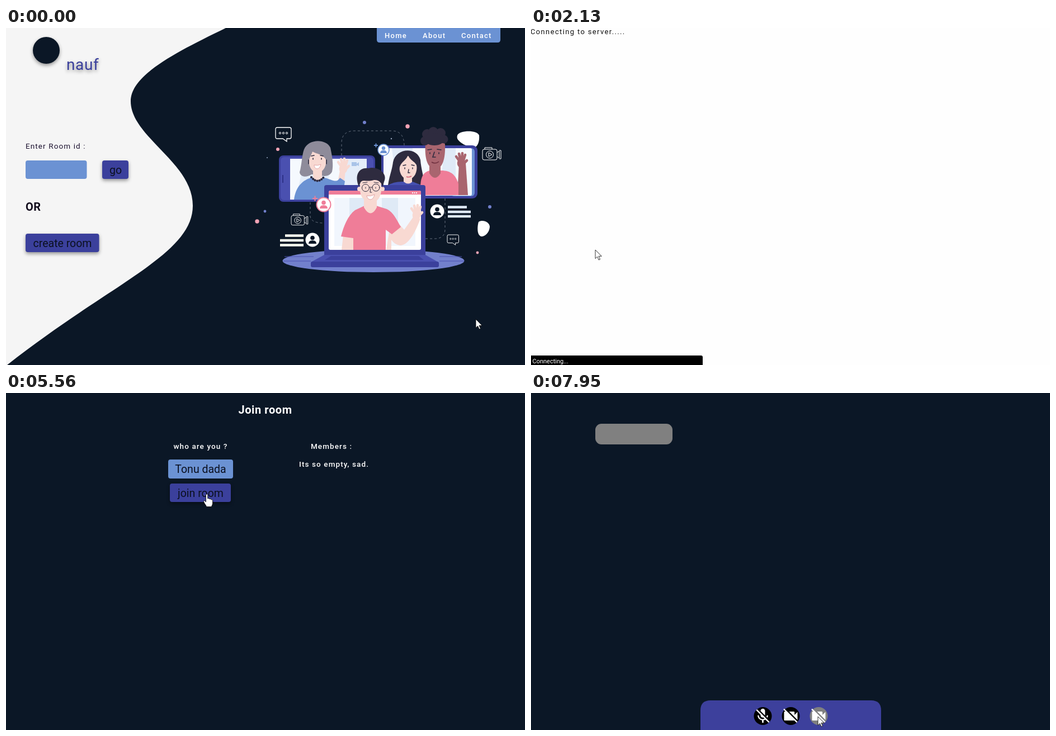
Recreate the animation shown at these times as an HTML page. Size 928 by 603 pixels, loop 8 s.

```html
<!DOCTYPE html>
<html lang="en">
<head>
<meta charset="utf-8">
<title>Video rooms</title>
<style>
html, body { margin: 0; width: 100%; height: 100%; overflow: hidden; background: #0b1726; }
svg { display: block; width: 928px; height: 603px; }
text { font-family: Roboto, "Open Sans", sans-serif; white-space: pre; }
.mid { text-anchor: middle; }
.btn { font-size: 19.5px; fill: #0b1020; text-anchor: middle; }
.small { font-size: 13.5px; letter-spacing: 1.1px; }
.nav { font-size: 13px; font-weight: 500; letter-spacing: 1.3px; fill: #fff; }
.blue { fill: #6b92d3; }
.indigo { fill: #3b409c; }
.pink { fill: #ef7d98; }
.dark { fill: #2e2b3f; }
.skin { fill: #f8d9d2; color: #f8d9d2; }
.brown { fill: #a9656f; color: #a9656f; }
.line { fill: none; stroke: #fff; }
.ink { fill: none; stroke: #2e2b3f; stroke-linecap: round; }
.drop { filter: drop-shadow(0 3px 3px rgba(0, 0, 0, .4)); }

#home, #wait, #join, #room { animation: home 8s step-end infinite; }
#wait { animation-name: wait; }
#join { animation-name: join; }
#room { animation-name: room; }
@keyframes home { 0% { visibility: visible } 25.5%, 100% { visibility: hidden } }
@keyframes wait { 0%, 28.25%, 100% { visibility: hidden } 25.5% { visibility: visible } }
@keyframes join { 0%, 70%, 100% { visibility: hidden } 28.25% { visibility: visible } }
@keyframes room { 0% { visibility: hidden } 70%, 100% { visibility: visible } }

#dots { animation: pulse 2s ease-in-out infinite; }
@keyframes pulse { 50% { opacity: .6 } }

.shine { fill: url(#shine); animation: sweepCreate 8s linear infinite; }
#join .shine { animation-name: sweepJoin; }
@keyframes sweepCreate { 0%, 21.5% { transform: translateX(-131px) } 25.6%, 100% { transform: translateX(131px) } }
@keyframes sweepJoin { 0%, 41.5% { transform: translateX(-109px) } 44.8%, 100% { transform: translateX(109px) } }

#tag { animation: tag 8s linear infinite; }
@keyframes tag { 0%, 76.5% { opacity: 0 } 79%, 88.6% { opacity: .75 } 91%, 100% { opacity: 0 } }
#share { animation: share 8s linear infinite; }
@keyframes share { 0%, 98.2% { fill: #000 } 99.1%, 100% { fill: #808080 } }
</style>
</head>
<body>
<svg viewBox="0 0 928 603">
<defs>
  <linearGradient id="shine" x2="1" y2=".1">
    <stop offset=".2" stop-color="#fff" stop-opacity="0"/>
    <stop offset=".5" stop-color="#fff" stop-opacity=".4"/>
    <stop offset=".8" stop-color="#fff" stop-opacity="0"/>
  </linearGradient>
  <clipPath id="createClip"><rect x="35" y="368" width="131" height="33" rx="4"/></clipPath>
  <clipPath id="joinClip"><rect x="293" y="162" width="109" height="33" rx="4"/></clipPath>
  <clipPath id="pillClip"><rect width="138" height="37" rx="11"/></clipPath>

  <g id="arrow"><path d="M0 0V15.5L3.6 12.2L6.1 18L8.5 17L6 11.3H11.2Z" fill="#fff" stroke="#000" stroke-width=".8"/></g>
  <g id="pointer"><path d="M-1.6 1.5C-1.6-.5 1.7-.5 1.7 1.5V8C3 7 5 7.4 5 9C6.3 8 8 8.6 8 10C9.4 9.4 10.5 10 10.5 11.5V16C10.5 19 9 20 8.5 22.5H-.5C-1 20-4 17.5-5.5 13.5C-6.2 11.3-3.7 10.7-1.6 14Z" fill="#fff" stroke="#000" stroke-width=".8"/></g>
  <g id="beam"><path d="M-3-7H3M0-7V7M-3 7H3" fill="none" stroke="#4a4038" stroke-width="1.2"/></g>
  <g id="grab">
    <path d="M-4-2V-4Q-3-6-1.7-4.5Q-.3-6.5 1.2-4.5Q2.8-6 3.8-3.8Q6-4 5.5-1Q5.5 3 3.5 6H-2.5Q-6 2-6.5-.5Q-5.5-2.5-4-1Z" fill="#fff" stroke="#000" stroke-width=".9"/>
    <circle id="press" r="11" fill="#e4de18" fill-opacity=".65"/>
  </g>

  <g id="hand" fill="none" stroke="currentColor" stroke-width="4.6" stroke-linecap="round">
    <path d="M-2 0L-9-10M-1-2L-4-15M1-2L2-16M3 0L7-13M3 4L10-3"/>
    <ellipse cy="2" rx="5" ry="6" fill="currentColor"/>
  </g>
  <g id="bubble">
    <path class="line" stroke-width="1.3" d="M3 0H25Q28 0 28 3V17Q28 20 25 20H20V25L13 20H3Q0 20 0 17V3Q0 0 3 0Z"/>
    <g class="line"><circle cx="8" cy="10" r="1.6"/><circle cx="14" cy="10" r="1.6"/><circle cx="20" cy="10" r="1.6"/></g>
  </g>
  <g id="camera" class="line">
    <rect y="4" width="26" height="19" rx="3"/>
    <path d="M4 4V1H17V4M26 10L30 7V20L26 17M30 6H33V21H30M11 10L17 13.5L11 17Z"/>
    <circle cx="13" cy="13.5" r="6.5"/>
  </g>
  <g id="person"><circle cy="-3.5" r="3.8"/><path d="M-7 7Q-7 1 0 1Q7 1 7 7Z"/></g>
  <path id="micOff" d="M19 11h-1.7c0 .74-.16 1.43-.43 2.05l1.23 1.23c.56-.98.9-2.09.9-3.28zm-4.02.17c0-.06.02-.11.02-.17V5c0-1.66-1.34-3-3-3S9 3.34 9 5v.18l5.98 5.99zM4.27 3L3 4.27l6.01 6.01V11c0 1.66 1.33 3 2.99 3 .22 0 .44-.03.65-.08l1.66 1.66c-.71.33-1.5.52-2.31.52-2.76 0-5.3-2.1-5.3-5.1H5c0 3.41 2.72 6.23 6 6.72V21h2v-3.28c.91-.13 1.77-.45 2.54-.9L19.73 21 21 19.73z"/>
  <path id="camOff" d="M21 6.5l-4 4V7c0-.55-.45-1-1-1H9.82L21 17.18zM3.27 2L2 3.27 4.73 6H4c-.55 0-1 .45-1 1v10c0 .55.45 1 1 1h12c.21 0 .39-.08.54-.18L19.73 21 21 19.73z"/>
</defs>

<rect width="928" height="603" fill="#0b1726"/>

<g id="home">
  <path d="M0 0H393C300 45 223 85 223 131C223 195 334 240 334 318C334 405 190 455 2 603H0Z" fill="#f5f5f5"/>
  <circle class="drop" cx="72" cy="40" r="24" fill="#0b1726"/>
  <text class="indigo drop" x="108" y="75" font-size="28" letter-spacing=".6">nauf</text>
  <path class="blue" d="M663 0H884V21Q884 26 879 26H668Q663 26 663 21Z"/>
  <text class="nav" x="677" y="18">Home</text>
  <text class="nav" x="745" y="18">About</text>
  <text class="nav" x="814" y="18">Contact</text>

  <text class="small" x="35" y="216" fill="#1c1230">Enter Room id :</text>
  <rect class="blue" x="35" y="237" width="109.500" height="33" rx="4"/>
  <rect class="indigo drop" x="172" y="237" width="47" height="33" rx="4"/>
  <text class="btn" x="196" y="261">go</text>
  <text x="35" y="327" font-size="20" font-weight="700" letter-spacing=".5" fill="#120c1c">OR</text>
  <rect class="indigo drop" x="35" y="368" width="131.500" height="33" rx="4"/>
  <text class="btn" x="101" y="392">create room</text>
  <g clip-path="url(#createClip)"><rect class="shine" x="35" y="368" width="131" height="33"/></g>

  <g fill="none" stroke="#66707f" stroke-dasharray="4 4">
    <path d="M600 228V206Q600 184 624 184H690Q712 184 712 211"/>
    <path d="M544 312V336Q544 349 569 349"/>
    <path d="M785 305V360Q785 377 766 377H750"/>
  </g>
  <g fill="#fff">
    <path d="M807 192C811 183 842 182 846 192C847 204 843 214 834 215C826 211 817 209 811 203Q805 198 807 192Z"/>
    <path d="M845 347C852 342 865 347 865 356C864 366 857 373 850 373C841 371 843 353 845 347Z"/>
  </g>
  <g id="dots">
    <g fill="#f4a3b5"><circle cx="718" cy="176" r="3.7"/><circle cx="486" cy="217" r="3"/><circle cx="449" cy="346" r="3.7"/><circle cx="843" cy="402" r="2.4"/></g>
    <g fill="#7280cc"><circle cx="641" cy="169" r="3"/><circle cx="463" cy="328" r="2.4"/><circle cx="865" cy="320" r="3"/></g>
    <g fill="#9aa8c0"><circle cx="467" cy="232" r="1"/><circle cx="689" cy="198" r="1.2"/></g>
  </g>
  <use href="#bubble" x="482" y="178"/>
  <use href="#bubble" transform="translate(789 370) scale(.73)"/>
  <use href="#camera" x="852" y="213"/>
  <use href="#camera" transform="translate(510 332) scale(.9)"/>
  <path d="M499 371.500H532M490 380H532M490 388.500H532" stroke="#fbfdf0" stroke-width="4.500"/>
  <path d="M790 320.500H824M790 329H831M790 337H831" stroke="#dfeaf8" stroke-width="4.500"/>
  <g fill="#fff"><circle cx="548" cy="379" r="12.500"/><circle cx="771" cy="328" r="12.500"/></g>
  <g fill="#0b1726"><use href="#person" x="548" y="379"/><use href="#person" x="771" y="328"/></g>

  <ellipse cx="657" cy="416.500" rx="162.500" ry="20.500" fill="#7280cc"/>
  <path d="M498 409H550M496 417H545M775 409H815M775 417H819" stroke="#4a50b0"/>

  <!-- phone -->
  <rect class="indigo" x="488" y="228" width="172" height="83" rx="8"/>
  <rect x="491" y="231" width="166" height="77" rx="6" fill="#4a50b0"/>
  <rect x="508" y="234" width="137" height="73" fill="#e4edf9"/>
  <path d="M508 234H534L518 307H508ZM585 234H612L596 307H568Z" fill="#f5f9fe"/>
  <path d="M495 263V277" stroke="#2e3288" stroke-width="2"/>
  <path d="M618 240H627V247H618ZM627 243L631 240V247L627 245Z" fill="#a9c3e8"/>
  <g class="skin"><path d="M597 255H607L604 282H592Z"/><use href="#hand" x="603" y="250"/></g>
  <path d="M525 258C529 244 529 227 533 217C541 198 572 198 580 214C583 228 586 245 583 257C579 266 566 267 560 262H546C538 268 526 267 525 258Z" fill="#8e8b9a"/>
  <g class="skin"><ellipse cx="557" cy="238" rx="15.500" ry="21"/><path d="M549 253H565V268L557 278L549 268Z"/></g>
  <path d="M541 240C542 232 546 228 548 221C556 226 571 226 574 241C580 213 568 206 557 206C544 206 534 217 541 240Z" fill="#8e8b9a"/>
  <path class="blue" d="M515 307C518 284 530 272 548 267Q557 279 566 267C584 271 591 279 597 268L606 274C604 290 599 302 594 307Z"/>
  <path class="ink" d="M546 267Q557 280 568 267" stroke-width="4.200" stroke-dasharray="0 4.200"/>
  <path class="ink" d="M549 233V235M564 233V235M546 229L551 228M562 228L567 229M541 236V243M573 236V243" stroke-width="1.600"/>
  <path d="M551 245Q557 247 563 244Q561 252 556 252Q551 251 551 245Z" fill="#fff" stroke="#d98b90" stroke-width=".7"/>

  <!-- tablet -->
  <rect class="indigo" x="671" y="210" width="172" height="95" rx="9"/>
  <rect class="blue" x="795" y="215" width="43" height="86" rx="6"/>
  <rect x="675" y="215" width="158" height="85" rx="3" fill="#f5f9fe"/>
  <path d="M690 215H727V300H700ZM784 215H804V300H775Z" fill="#e0eaf7"/>
  <path class="dark" d="M683 282C686 262 690 256 692 240C697 214 735 212 741 236C742 251 747 266 749 283Z"/>
  <g class="skin"><ellipse cx="719" cy="250" rx="15.500" ry="21"/><path d="M711 265H726V282H711Z"/></g>
  <path class="dark" d="M703 255C704 239 715 239 719 227C722 238 733 238 736 250C741 223 725 221 717 222C705 222 696 233 703 255Z"/>
  <path d="M682 282Q694 274 711 275Q719 282 727 275L745 282Z" fill="#4550b0"/>
  <path class="ink" d="M713 250V252M727 250V252M710 246L715 245M725 245L730 246M720 253L719 259H722" stroke-width="1.400"/>
  <path d="M716 266Q720 268 725 265" stroke="#d66578" stroke-width="1.500" fill="none"/>
  <g class="brown"><path d="M810 242H822L826 299H807Z"/><use href="#hand" x="814" y="240"/></g>
  <path class="pink" d="M742 299C739 273 743 258 758 255H778C796 255 804 263 809 279V299Z"/>
  <g class="brown"><path d="M757 240H777V260Q767 276 757 260Z"/><path d="M750 207C755 196 780 196 785 208C786 235 780 252 768 252C754 252 748 235 750 207Z"/></g>
  <g class="dark"><circle cx="749" cy="202" r="8"/><circle cx="753" cy="190" r="9"/><circle cx="764" cy="186" r="9"/><circle cx="777" cy="188" r="9"/><circle cx="783" cy="199" r="7.500"/><ellipse cx="766" cy="199" rx="18" ry="11"/></g>
  <path class="ink" d="M758 223V225M774 223V225M754 218L761 217M771 217L778 218M766 222L763 231H768" stroke-width="1.600"/>
  <path d="M761 240Q768 244 774 239" stroke="#6d2f3e" stroke-width="1.600" fill="none"/>

  <!-- laptop -->
  <rect class="indigo" x="569" y="281" width="181" height="128" rx="4"/>
  <rect x="577" y="291" width="165" height="106" rx="3" fill="#fff"/>
  <path d="M587 304H732V390H587Z" fill="#f1f6fd"/>
  <path d="M614 304H640V350H614ZM672 304H701V350H672Z" fill="#dfeaf6"/>
  <path class="pink" d="M577 298V294Q577 291 580 291H739Q742 291 742 294V298Z"/>
  <path d="M726 295H735" stroke="#fff" stroke-width="2" stroke-dasharray="2 1.500"/>
  <g class="skin">
    <path d="M603 371H621V397H600ZM686 358L704 352L712 361L729 337L741 341C731 369 718 389 705 389Q695 388 689 379V397H680Z"/>
    <use href="#hand" x="734" y="333"/>
  </g>
  <path class="pink" d="M599 373C604 354 611 336 624 326L641 318H662L681 324C693 330 699 344 706 356L690 369L679 361V397H621V376Z"/>
  <g class="skin">
    <path d="M640 301H663V321Q652 342 640 321Z"/>
    <path d="M633 270H671V289C671 303 663 312 654 312C642 312 633 303 633 289Z"/>
    <circle cx="632" cy="288" r="4"/><circle cx="673" cy="288" r="4"/>
  </g>
  <path class="dark" d="M631 284C622 262 632 249 648 251C662 246 684 259 676 275L673 286C673 277 666 271 658 272C645 276 638 270 634 276Z"/>
  <g class="ink"><circle cx="643" cy="286" r="6.500"/><circle cx="661.500" cy="285.500" r="6.500"/><path d="M650 285H655M652 287L651 294H654M643 285V287M661 285V287M638 277L646 276M658 276L666 277"/></g>
  <path d="M645 300Q652 302 659 298Q657 307 651 307Q646 306 645 300Z" fill="#fff" stroke="#d98b90" stroke-width=".7"/>
  <path d="M569 406H750L773 419H545Z" fill="#4a50b0"/>
  <path d="M581 408H738L747 415H570Z" fill="#3b409c"/>
  <rect class="indigo" x="545" y="418" width="229" height="10" rx="3"/>

  <circle cx="568" cy="316" r="12.500" fill="#fff" stroke="#ef7d98" stroke-width="2"/>
  <use class="pink" href="#person" x="568" y="316"/>
  <path d="M548 305H557M552.500 300.500V309.500" stroke="#ef7d98" stroke-width="2"/>
  <circle cx="675" cy="218" r="10" fill="#fff" stroke="#6b92d3" stroke-width="1.500"/>
  <use class="blue" href="#person" transform="translate(675 218) scale(.85)"/>
  <path d="M658 210H665M661.500 206.500V213.500" stroke="#6b92d3" stroke-width="1.800"/>
</g>

<g id="wait">
  <rect width="928" height="603" fill="#fefefe"/>
  <text x="-1" y="11" font-size="13" letter-spacing="1.35" fill="#111">Connecting to server.....</text>
  <path d="M0 586H304Q307 586 307 589V603H0Z"/>
  <text x="2.5" y="600" font-size="11" fill="#fff">Connecting...</text>
</g>

<g id="join">
  <g class="mid" fill="#fff" font-weight="500">
    <text x="463.5" y="37" font-size="20" font-weight="700" letter-spacing=".6">Join room</text>
    <text class="small" x="348" y="100">who are you ?</text>
    <text class="small" x="582" y="100">Members :</text>
    <text class="small" x="586.5" y="132">Its so empty, sad.</text>
  </g>
  <rect class="blue" x="290" y="119" width="116" height="34" rx="4"/>
  <text id="field" class="mid" x="348" y="143" font-size="19.5" fill="#0b1020"></text>
  <rect id="caret" y="125" width="1.2" height="23" fill="#0b1020"/>
  <rect class="indigo drop" x="293" y="162" width="109" height="33" rx="4"/>
  <text class="btn" x="348" y="186">join room</text>
  <g clip-path="url(#joinClip)"><rect class="shine" x="293" y="162" width="109" height="33"/></g>
</g>

<g id="room">
  <g id="pill" clip-path="url(#pillClip)">
    <rect width="138" height="37" fill="#808080"/>
    <text id="tag" x="18" y="36" font-size="13" letter-spacing="1.5" fill="#111"></text>
  </g>
  <path d="M303 603V568Q303 550 321 550H608Q626 550 626 568V603Z" fill="#3d409c"/>
  <circle cx="414.5" cy="578" r="16"/><circle cx="464.5" cy="578" r="16"/><circle id="share" cx="514.5" cy="578" r="16"/>
  <g fill="#fff">
    <use href="#micOff" transform="translate(398.5 562) scale(1.333)"/>
    <use href="#camOff" transform="translate(448.5 562) scale(1.333)"/>
    <use href="#camOff" transform="translate(498.5 562) scale(1.333)"/>
  </g>
</g>

<use id="cursor" href="#arrow"/>
</svg>
<script>
const LOOP = 8000;
const NAME = 'Tonu dada';
const $ = id => document.getElementById(id);

// time, x, y of the pointer
const path = [
  [0, 840, 521], [880, 840, 521], [1050, 760, 500], [1250, 540, 455], [1450, 290, 440],
  [1640, 157, 432], [1740, 120, 400], [1860, 105, 375], [2000, 105, 376], [2130, 115, 397],
  [2250, 125, 370], [2450, 189, 237], [2650, 270, 160], [2800, 318, 113], [2880, 328, 130],
  [2960, 352, 130], [3000, 384, 140], [3060, 370, 140], [3270, 370, 140], [3400, 360, 172],
  [3580, 359, 181], [5820, 359, 181], [6000, 250, 100], [6160, 90, 25], [6250, 56, 15],
  [6350, 56, 15], [6480, 110, 40], [6620, 164, 66], [6720, 172, 72], [7070, 172, 72],
  [7200, 300, 260], [7340, 416, 479], [7610, 416, 479], [7800, 470, 545], [7930, 513, 579],
  [LOOP, 513, 579]
];
const shapes = [
  [0, 'arrow'], [1720, 'pointer'], [2040, 'arrow'], [2840, 'beam'], [3330, 'pointer'],
  [5600, 'arrow'], [6150, 'grab'], [7100, 'arrow']
];

const within = (t, a, b) => t >= a && t < b;
const latest = (list, t) => list.findLast(item => item[0] <= t);

function pointerAt(t) {
  const i = path.findIndex(p => p[0] > t);
  const [t0, x0, y0] = path[i - 1], [t1, x1, y1] = path[i];
  const k = (t - t0) / (t1 - t0);
  return [x0 + (x1 - x0) * k, y0 + (y1 - y0) * k];
}

function fieldAt(t) {
  if (t < 4380) return latest([[0, '123'], [3930, '12'], [4020, '1'], [4110, '']], t)[1];
  return NAME.slice(0, Math.floor((t - 4380) / 68.8));
}

const show = (el, on) => el.setAttribute('opacity', on ? 1 : 0);
const move = (el, x, y) => el.setAttribute('transform', `translate(${x} ${y})`);

function render(t) {
  const [x, y] = pointerAt(t);
  move($('cursor'), x, y);
  $('cursor').setAttribute('href', '#' + latest(shapes, t)[1]);
  show($('press'), within(t, 6250, 7080));

  const [px, py] = pointerAt(Math.min(Math.max(t, 6300), 7000));
  move($('pill'), px - 57, py - 17);

  const field = $('field');
  field.textContent = fieldAt(t);
  $('caret').setAttribute('x', 348 + field.getComputedTextLength() / 2);
  show($('caret'), within(t, 2960, 3850) || within(t, 3930, 4190) || within(t, 4380, 5350));
}

$('tag').textContent = 'Me : ' + NAME;
let start;
function tick(now) {
  start ??= now;
  render((now - start) % LOOP);
  requestAnimationFrame(tick);
}
render(0);
requestAnimationFrame(tick);
</script>
</body>
</html>
```
